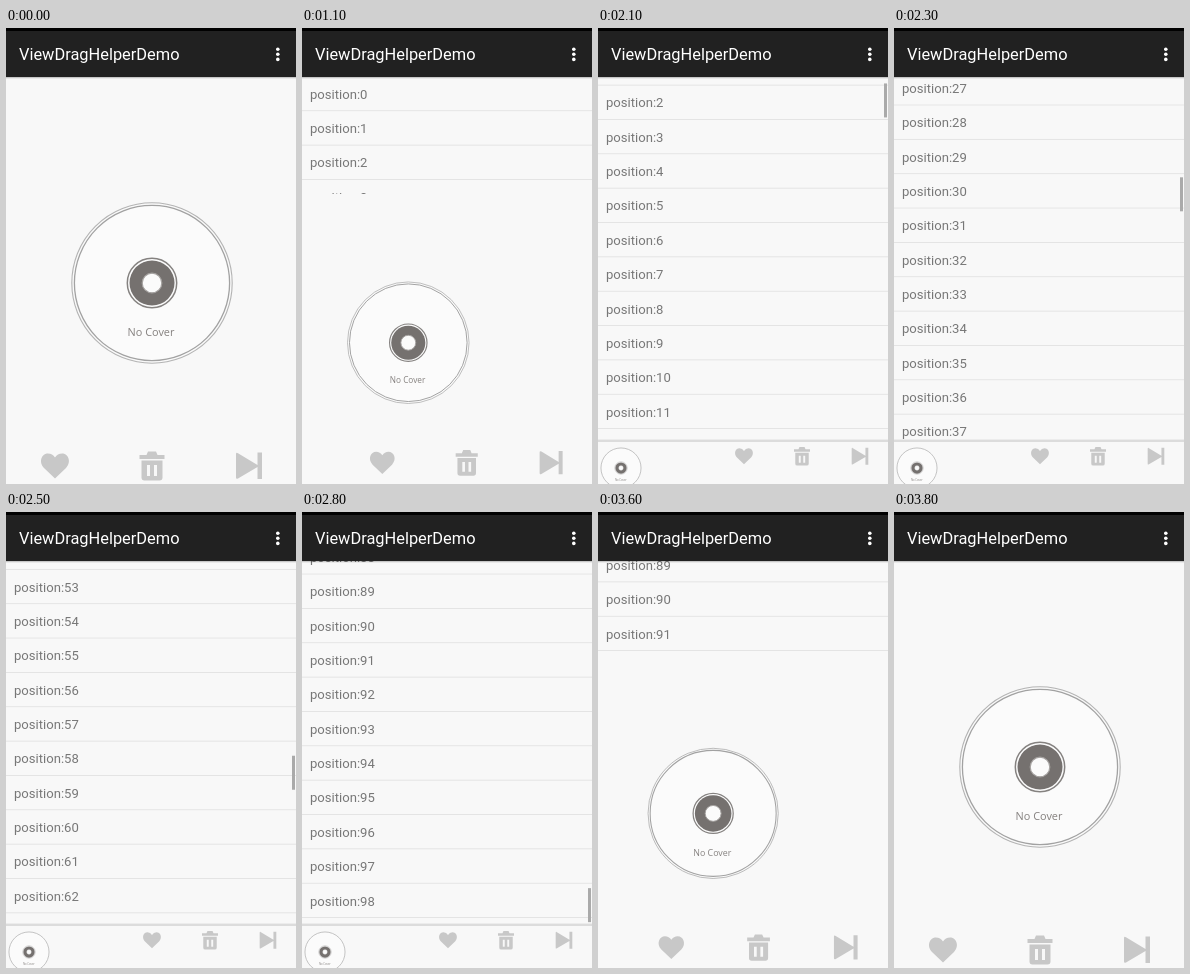
These frames come from a looping animation (290 by 456 pixels, 4500 ms). An HTML page with a canvas:

```html
<!DOCTYPE html>
<html lang="en">
<head>
<meta charset="utf-8">
<style>
html, body { margin: 0; width: 100%; height: 100%; overflow: hidden; background: #f8f8f8; }
canvas { display: block; }
</style>
</head>
<body>
<canvas id="stage" width="290" height="456"></canvas>
<script>
const ctx = document.getElementById('stage').getContext('2d');
const W = 290, H = 456, TOP = 48, DOCK = 413, ROW = 34.35, LOOP = 4500;
const END = ROW * 100 - (DOCK - TOP);
const GRAY = '#c8c8c8', PAPER = '#f8f8f8';

const heart = new Path2D('M0 13 L-11 2.5 C-17 -4-13-12-7-12 Q-2.5-12 0-8 Q2.5-12 7-12 C13-12 17-4 11 2.5Z');
const trash = new Path2D('M-12.5-10.5H-5.5L-4-14H4L5.5-10.5H12.5V-6.5H-12.5Z ' +
  'M-10.5-5H10.5V12Q10.5 15 7.5 15H-7.5Q-10.5 15-10.5 12Z ' +
  'M-5-0.5V10.5H-2V-0.5Z M2-0.5V10.5H5V-0.5Z');
const next = new Path2D('M-13-11.5Q-13-13.5-11-12.3L8.5-0.5V-13H13V13.5H8.5V1.5L-11 13Q-13 14-13 12Z');

const mix = (a, b, p) => a + (b - a) * p;
const clamp = v => Math.max(0, Math.min(1, v));
const settle = ms => 1 - (1 - clamp(ms / 600)) ** 5;

function dockAmount(t) {
  if (t < 1100 || t >= 3800) return 0;
  if (t < 1500) return settle(t - 1055);
  return t < 3500 ? 1 : 1 - settle(t - 3455);
}

function scrollOffset(t) {
  const keys = [[2000, 0], [2100, 60], [2300, 933.2], [2700, 2690], [2800, 3043.5], [2900, 3064], [3000, END]];
  if (t <= 2000) return 0;
  const i = keys.findIndex(k => t <= k[0]);
  if (i < 0) return END;
  const [t0, y0] = keys[i - 1], [t1, y1] = keys[i];
  return mix(y0, y1, (t - t0) / (t1 - t0));
}

function rect(color, x, y, w, h) {
  ctx.fillStyle = color;
  ctx.fillRect(x, y, w, h);
}

function circle(x, y, r, fill, stroke, width = 1) {
  ctx.beginPath();
  ctx.arc(x, y, r, 0, 7);
  if (fill) { ctx.fillStyle = fill; ctx.fill(); }
  if (stroke) { ctx.strokeStyle = stroke; ctx.lineWidth = width; ctx.stroke(); }
}

function text(str, x, y, font, color) {
  ctx.font = font;
  ctx.fillStyle = color;
  ctx.fillText(str, x, y);
}

function drawList(t) {
  const off = scrollOffset(t);
  const first = Math.floor(off / ROW);
  for (let i = first; i < Math.min(100, first + 12); i++) {
    const y = TOP + i * ROW - off;
    text('position:' + i, 8, Math.round(y + 22.7), '13.1px Roboto, sans-serif', '#777');
    rect('#e0e0e0', 0, y + ROW, W, 0.8);
  }
  const alpha = t < 2100 ? 0 : 1 - clamp((t - 3130) / 300);
  rect(`rgba(170,170,170,${alpha})`, 286, TOP + 1 + off / END * 330, 3, 34);
}

function drawDisc(p) {
  ctx.save();
  ctx.translate(mix(146, 23, p), mix(255, 440, p));
  const s = mix(1, 0.25, p);
  ctx.scale(s, s);
  const thin = Math.max(1, 0.7 / s);
  circle(0, 0, 79, '#fbfbfb');
  circle(0, 0, 80.2, null, '#b4b4b4', thin * 1.1);
  if (p < 0.9) circle(0, 0, 77.6, null, '#a2a2a2', 1.3);
  circle(0, 0, 24.7, '#fbfbfb', '#858280', 1.5);
  circle(0, 0, 22.5, '#75716f');
  circle(0, 0, 9.8, '#fbfbfb', '#a5a2a0', 1.2);
  ctx.textAlign = 'center';
  text('No Cover', -1, 53, '10.9px "Open Sans", "Noto Sans", sans-serif', '#85817f');
  ctx.restore();
}

function drawIcon(path, x0, x1, p) {
  ctx.save();
  ctx.translate(mix(x0, x1, p), mix(437.5, 428, p));
  const s = mix(1, 0.64, p);
  ctx.scale(s, s);
  ctx.fillStyle = GRAY;
  ctx.fill(path, 'evenodd');
  ctx.restore();
}

function drawPanel(p) {
  const y = Math.round(mix(TOP, DOCK, p));
  rect(PAPER, 0, y, W, H);
  if (p > 0.95) {
    rect('#ececec', 0, y - 2, W, 1);
    rect('#dcdcdc', 0, y - 1, W, 2);
  }
  drawDisc(p);
  drawIcon(heart, 49, 146, p);
  drawIcon(trash, 146, 204, p);
  drawIcon(next, 243, 262, p);
}

function drawBar() {
  rect('#212121', 0, 0, W, TOP + 1);
  rect('#000', 0, 0, W, 3);
  rect('rgba(0,0,0,.2)', 0, TOP + 1, W, 1);
  rect('rgba(0,0,0,.06)', 0, TOP + 2, W, 1);
  text('ViewDragHelperDemo', 13, 32, '16.4px Roboto, sans-serif', '#fff');
  for (const y of [21.2, 26.3, 31.4]) circle(271.8, y, 1.8, '#fff');
}

function frame(now) {
  const t = Math.floor(now % LOOP / 100) * 100;
  rect(PAPER, 0, 0, W, H);
  drawList(t);
  drawPanel(dockAmount(t));
  drawBar();
  requestAnimationFrame(frame);
}
frame(performance.now());
</script>
</body>
</html>
```
